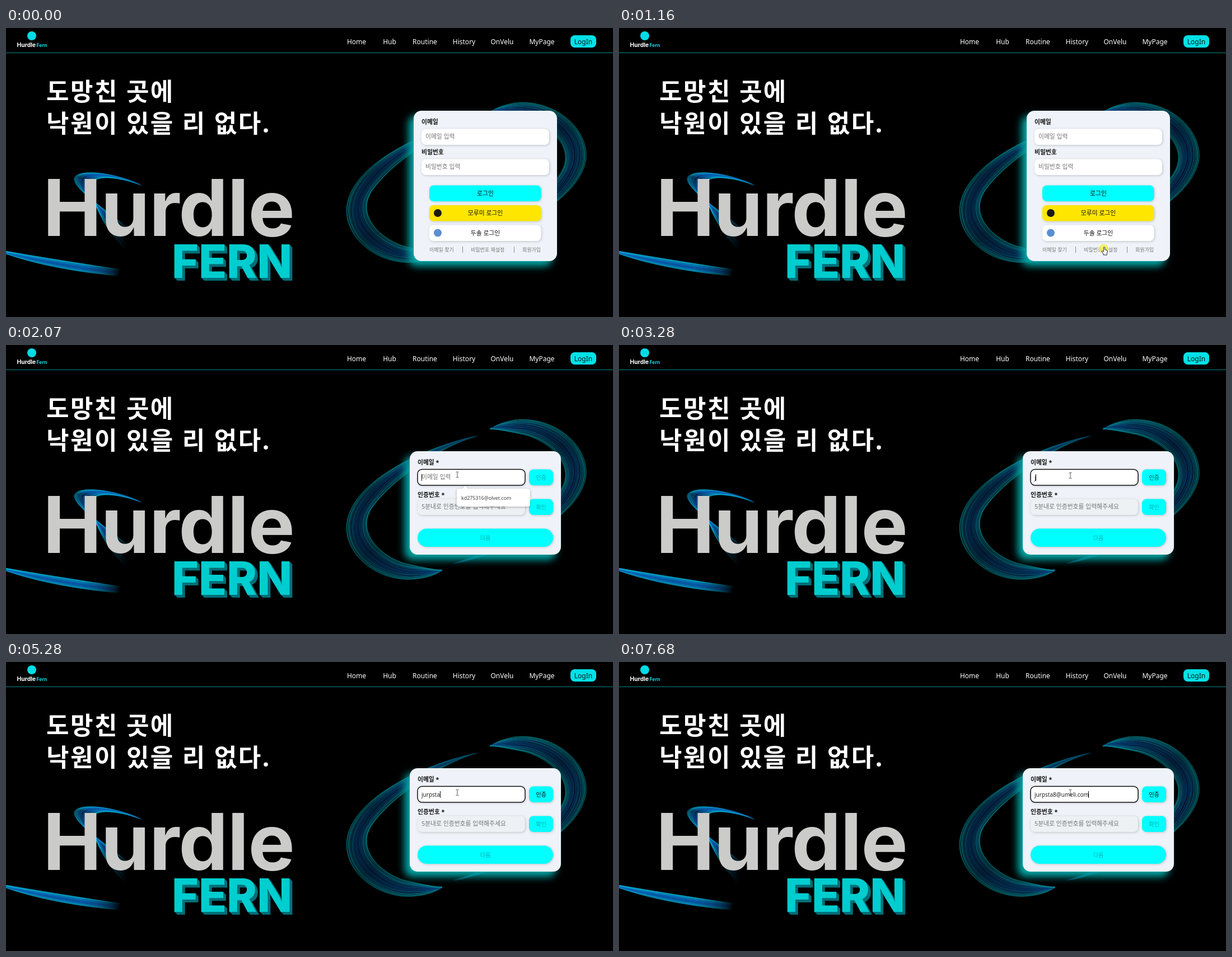
Write an HTML page with a canvas that moves like this. It is 1084 by 517 pixels and loops after 8000 ms.

```html
<!DOCTYPE html>
<html lang="ko">
<head>
<meta charset="utf-8">
<title>Login</title>
<style>
html, body { margin: 0; width: 100%; height: 100%; overflow: hidden; background: #000; }
canvas, svg { position: absolute; left: 0; top: 0; width: 1084px; height: 517px; }
text { font: 10.8px "Noto Sans", "Noto Sans CJK KR", sans-serif; fill: #111; white-space: pre; }
.mid { text-anchor: middle; }
.nav text { font-size: 12px; fill: #fff; text-anchor: middle; }
.nav .login { fill: #0b1a1c; }
.title text { font-size: 44px; font-weight: 700; letter-spacing: 2.5px; fill: #fff; }
.word { font-family: Inter, sans-serif; font-weight: 700; }
.soft { filter: blur(.7px); }
.panel { fill: #eff3f9; filter: drop-shadow(-9px 9px 7px #00a8a8); }
.label { font-weight: 700; }
.hint { fill: #757575; }
.field, .btn { filter: drop-shadow(1.5px 1.5px 2px rgba(0, 0, 0, .2)); }
.field { fill: #fff; }
.field.off { fill: #edf1f4; }
.btn { fill: #0ff; }
.dim { fill: #111; fill-opacity: .32; }
.small { font-size: 10.2px; }
.links text { font-size: 9px; fill: #777; }
#typed { font-size: 10px; fill: #222; }
#popup rect, #popup path { fill: #fff; }
#popup { filter: drop-shadow(0 1px 2px rgba(0, 0, 0, .3)); }
#popup text { font-size: 8.9px; fill: #444; }
</style>
</head>
<body>
<canvas id="art" width="1084" height="517"></canvas>
<svg viewBox="0 0 1084 517">
  <rect y="43.5" width="1084" height="1.6" fill="#005c5e"/>
  <circle cx="46" cy="14" r="8" fill="#00dce6"/>
  <text class="word" x="19.5" y="34" style="font-size:10.4px;fill:#fff">Hurdle</text>
  <text class="word" x="54.5" y="34" style="font-size:8.6px;fill:#00dce6">Fern</text>

  <g class="nav">
    <rect x="1008" y="13" width="46" height="22" rx="7.5" fill="#00e1e6"/>
    <text x="626" y="29">Home</text>
    <text x="685" y="29">Hub</text>
    <text x="748" y="29">Routine</text>
    <text x="818" y="29">History</text>
    <text x="886" y="29">OnVelu</text>
    <text x="957" y="29">MyPage</text>
    <text x="1031" y="29" class="login">LogIn</text>
  </g>

  <g class="title">
    <text x="72" y="130">도망친 곳에</text>
    <text x="72" y="187">낙원이 있을 리 없다.</text>
  </g>

  <g class="soft">
    <text class="word" x="66" y="372" style="font-size:140px;letter-spacing:-1px;fill:#cbccca">Hurdle</text>
    <g id="depth"></g>
    <text class="word" x="296" y="447" style="font-size:82px;font-weight:800;fill:#00cdcf">FERN</text>
  </g>

  <g id="signin">
    <rect class="panel" x="728" y="148" width="256" height="269" rx="14"/>
    <text class="label" x="742" y="172">이메일</text>
    <rect class="field" x="742" y="180.500" width="228" height="28.500" rx="8"/>
    <text class="hint" x="749" y="198">이메일 입력</text>
    <text class="label" x="742" y="226">비밀번호</text>
    <rect class="field" x="742" y="234.500" width="228" height="28.500" rx="8"/>
    <text class="hint" x="749" y="252">비밀번호 입력</text>
    <rect class="btn" x="756" y="281.500" width="199.500" height="28.500" rx="7.500"/>
    <rect class="btn" x="756" y="317" width="199.500" height="28.500" rx="7.500" style="fill:#ffe600"/>
    <rect class="btn" x="756" y="352.500" width="199.500" height="28.500" rx="7.500" style="fill:#fff"/>
    <circle cx="771" cy="331" r="7" fill="#1c1a10"/>
    <circle cx="771" cy="366.500" r="7" fill="#5b8fd0"/>
    <text class="mid" x="856" y="299.500">로그인</text>
    <text class="mid" x="856" y="335">모루미 로그인</text>
    <text class="mid" x="856" y="370.500">두솔 로그인</text>
    <g class="links">
      <text x="756" y="400">이메일 찾기</text>
      <text x="830" y="400">비밀번호 재설정</text>
      <text x="922" y="400">회원가입</text>
      <path d="M815.500 391v11M907.500 391v11" stroke="#888"/>
    </g>
  </g>

  <g id="verify">
    <rect class="panel" x="721" y="190" width="270" height="185" rx="14"/>
    <text class="label" x="735" y="214">이메일 *</text>
    <rect class="field" x="735" y="222.500" width="192" height="28.500" rx="8"/>
    <rect id="focus" x="735" y="222.500" width="192" height="28.500" rx="8" fill="none" stroke="#101010" stroke-width="1.500"/>
    <text id="hint" class="hint" x="742" y="240">이메일 입력</text>
    <text id="typed" x="742" y="240.500"></text>
    <rect id="caret" y="231" width="1" height="12" fill="#111"/>
    <rect class="btn" x="934" y="222.500" width="43" height="28.500" rx="7.500"/>
    <text id="send" class="mid dim small" x="955.500" y="240.500">인증</text>
    <text class="label" x="735" y="272">인증번호 *</text>
    <rect class="field off" x="735" y="275.500" width="192" height="28.500" rx="8"/>
    <text class="hint" x="742" y="293">5분내로 인증번호를 입력해주세요</text>
    <rect class="btn" x="934" y="275.500" width="43" height="28.500" rx="7.500"/>
    <text class="mid dim small" x="955.500" y="293.500">확인</text>
    <rect class="btn" x="735" y="328.500" width="242" height="32.500" rx="16"/>
    <text class="mid dim small" x="856" y="348.500">다음</text>
    <g id="popup">
      <path d="M814 258l6-6 6 6z"/>
      <rect x="805" y="257" width="131" height="32" rx="4"/>
      <text x="813" y="276.500">kd275316@olvet.com</text>
    </g>
  </g>

  <circle id="tap" cx="865.500" cy="395" fill="#f6f03c" fill-opacity=".75"/>
  <g id="arrow"><path d="M0 0V10.500L2.400 8.300 4 11.700 5.600 11 4.100 7.600H7.300Z" fill="#fff" stroke="#111" stroke-width=".6"/></g>
  <g id="hand"><path d="M-1.200 0.800Q0-.6 1.200.8V5L4.500 6Q6 6.500 5.800 8L4.800 12V14.500H-1.500V12.500L-4.600 8.300Q-4.300 6.600-2.800 7.500L-1.200 9Z" fill="#fff" stroke="#111" stroke-width=".9"/></g>
  <g id="beam"><path d="M-2.500-5H-.6L0-4.400.6-5H2.500M0-4.400V4.400M-2.500 5H-.6L0 4.400.6 5H2.500" fill="none" stroke="#444" stroke-width=".9"/></g>
</svg>
<script>
const $ = id => document.getElementById(id);
const ctx = $('art').getContext('2d');

let seed = 7;
const rand = () => (seed = seed * 16807 % 2147483647) / 2147483647;

// A ribbon is a bundle of strands between two chained Bezier edges.
function ribbon(edgeA, edgeB, count, edgeRgb, coreRgb, fade, alpha) {
  for (let i = 0; i < count; i++) {
    const u = Math.min(1, Math.max(0, (i + rand() - .5) / (count - 1)));
    const p = edgeA.map((a, k) => a + (edgeB[k] - a) * u + (rand() - .5) * 2);
    const mix = Math.abs(2 * u - 1) ** 1.6;
    const rgb = edgeRgb.map((c, k) => Math.round(coreRgb[k] + (c - coreRgb[k]) * mix));
    const paint = ctx.createLinearGradient(...fade);
    paint.addColorStop(0, `rgba(${rgb},0)`);
    paint.addColorStop(1, `rgba(${rgb},${alpha * (.6 + .4 * rand())})`);
    ctx.strokeStyle = paint;
    ctx.lineWidth = .8;
    ctx.beginPath();
    ctx.moveTo(p[0], p[1]);
    for (let k = 2; k < p.length; k += 6) ctx.bezierCurveTo(...p.slice(k, k + 6));
    ctx.stroke();
  }
}

const loopOuter = [845,162, 770,175, 620,235, 608,318, 602,375, 665,425, 730,419, 755,416, 768,410, 778,403];
const loopInner = [845,162, 780,178, 690,240, 655,290, 620,340, 680,385, 720,393, 745,398, 765,402, 778,403];
function loop() {
  ribbon(loopOuter, loopInner, 60, [0, 150, 155], [6, 62, 120], [845, 162, 725, 222], .7);
}
loop();
ctx.save();
ctx.translate(1643, 553);
ctx.rotate(Math.PI);
loop();
ctx.restore();

ribbon(
  [243,282, 200,260, 130,250, 122,268, 118,292, 205,340, 250,385, 290,420, 322,435, 317,447, 260,452, 100,440, 0,403],
  [243,282, 210,268, 168,263, 158,274, 148,300, 170,350, 203,385, 228,420, 262,440, 312,446, 240,438, 120,420, 0,400],
  55, [0, 185, 220], [8, 92, 180], [243, 282, 175, 265], .75);

// Extruded side of the lower word
for (let i = 5; i > 0; i--) {
  const side = document.querySelector('.soft > text:last-child').cloneNode(true);
  side.setAttribute('x', 296 + i);
  side.setAttribute('y', 447 + i);
  side.style.fill = '#006f78';
  $('depth').append(side);
}

const address = 'jurpsta8@umeli.com';
const keys = [
  [3150, 'j'], [3360, 'ju'], [4220, 'jup'], [4480, 'ju'],
  ...[4620, 4820, 4950, 5080, 5280, 5890, 6490, 6690, 6790, 6890, 6980, 7080, 7290, 7420, 7550, 7680]
    .map((at, i) => [at, address.slice(0, i + 3)])
];
const blink = 530;

const show = (id, on) => $(id).style.display = on ? '' : 'none';

// Eased travel in held steps, as a captured pointer moves
function glide(t, start, gap, steps, x0, y0, x1, y1) {
  const p = Math.min(1, Math.max(0, Math.floor((t - start) / gap) / steps));
  const e = 1 - (1 - p) ** 2;
  return [x0 + (x1 - x0) * e, y0 + (y1 - y0) * e];
}

function pointer(t) {
  if (t < 150) return ['none', 0, 0];
  if (t < 790) return ['arrow', ...glide(t, 150, 70, 6, 994, 491, 869, 388)];
  if (t < 1240) return ['hand', 866.5, 391.5];
  if (t < 1460) return ['arrow', 866, 393];
  const [x, y] = glide(t, 1384, 76, 7, 866, 393, 806, 232);
  if (t < 1840) return ['arrow', x, y];
  return ['beam', x, t < 2680 ? y : 233.5];
}

function draw(t) {
  show('signin', t < 1240);
  show('verify', t >= 1240);
  show('focus', t >= 2000);
  show('popup', t >= 2070 && t < 3150);

  const key = keys.filter(k => k[0] <= t).pop();
  const text = key ? key[1] : '';
  $('typed').textContent = text;
  show('hint', !text);
  $('send').style.fillOpacity = text ? Math.min(1, .32 + (t - 3150) / 350) : .32;

  const since = t - (key ? key[0] : 2020);
  show('caret', t >= 2000 && Math.floor(since / blink) % 2 === 0);
  $('caret').setAttribute('x', 742 + (text ? Math.floor($('typed').getComputedTextLength()) : 0));

  show('tap', t >= 1010 && t < 1240);
  $('tap').setAttribute('r', t < 1160 ? 7 : 8.5);

  const [kind, x, y] = pointer(t);
  for (const id of ['arrow', 'hand', 'beam']) show(id, id === kind);
  if (kind !== 'none') $(kind).setAttribute('transform', `translate(${x} ${y})`);
}

const begin = performance.now();
function tick() {
  draw((performance.now() - begin) % 8000);
  requestAnimationFrame(tick);
}
tick();
</script>
</body>
</html>
```
